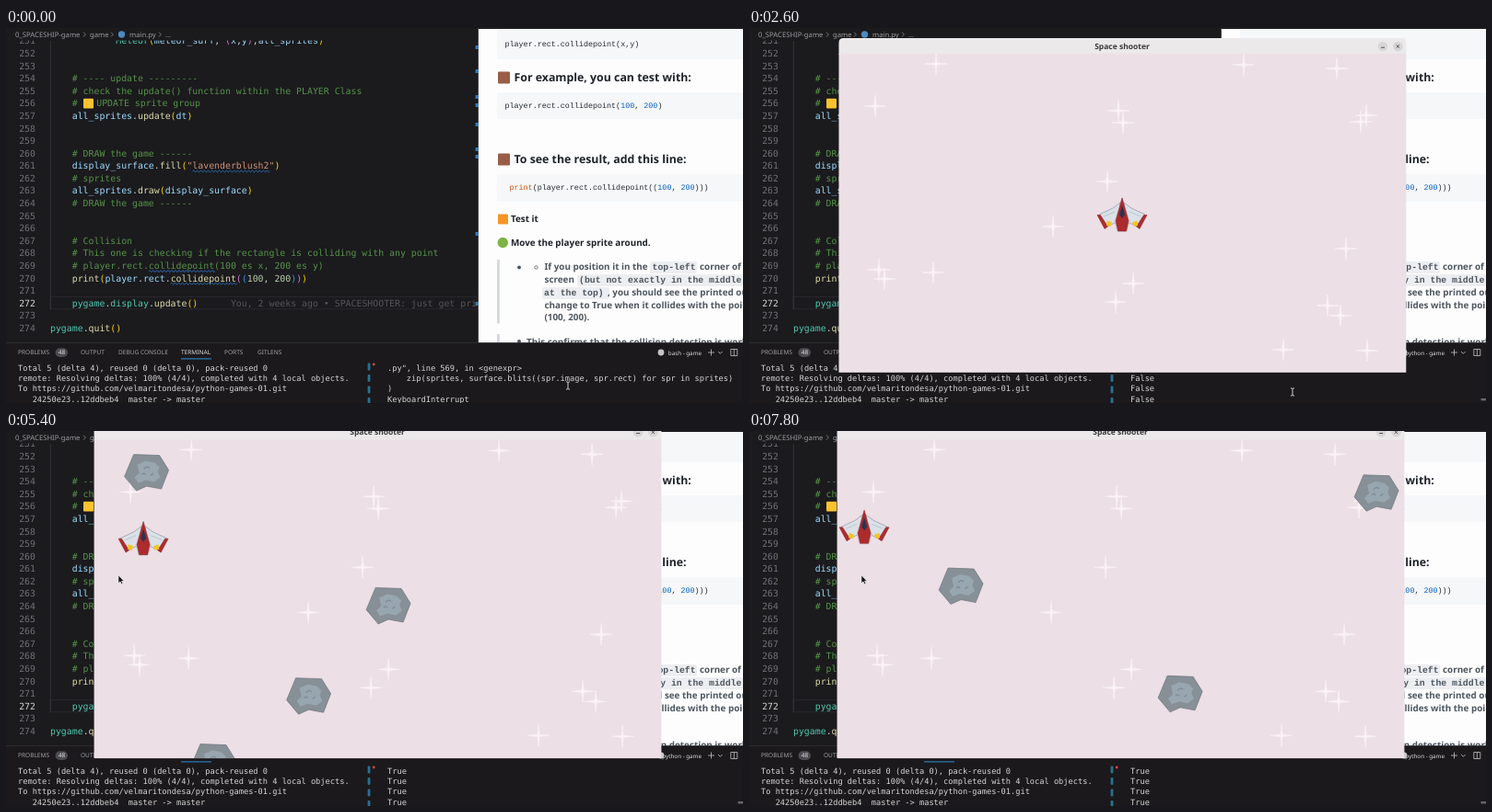
Animation of 800x408 px, one loop 8 s. Source, as an HTML page:

```html
<!DOCTYPE html>
<html lang="en">
<head>
<meta charset="utf-8">
<title>Space shooter</title>
<style>
html, body { margin: 0; width: 100%; height: 100%; overflow: hidden; background: #1b1a1d; }
svg { display: block; width: 100vw; height: 100vh; }
text { white-space: pre; text-rendering: geometricPrecision; }
.code { font: 9.87px "DejaVu Sans Mono", monospace; fill: #d4d4d4; }
.term { font: 8.66px "DejaVu Sans Mono", monospace; fill: #d6d6d6; }
.ui { font: 6.55px "Noto Sans", sans-serif; fill: #a2a2a5; }
.shell { font-size: 6.25px; text-anchor: end; }
.crumb { font: 7.7px "Noto Sans", sans-serif; fill: #9c9c9f; }
.doc { font: bold 9.87px "Noto Sans", sans-serif; fill: #1f2328; }
.head { font-size: 12.35px; }
.quote { fill: #4d565f; }
.block { font: 8.4px "Liberation Mono", monospace; fill: #24292e; }
.inline { font: bold 9.8px "Liberation Mono", monospace; fill: #4d565f; }
.title { font: bold 8.5px "Noto Sans", sans-serif; fill: #3a3a3a; text-anchor: middle; }
.c { fill: #559349; } .v { fill: #9cdcfe; } .f { fill: #dcdcaa; } .t { fill: #4ec9b0; }
.s { fill: #ce9178; } .n { fill: #b5cea8; } .g { fill: #ffd700; } .m { fill: #da70d6; }
.b { fill: #179fff; } .h { fill: #56565a; } .num { fill: #6f7278; } .on { fill: #dcdcdc; }
.k { fill: #005cc5; } .o { fill: #c2560c; }
.user { fill: #8ae234; font-weight: bold; } .path { fill: #5c9de6; font-weight: bold; }
</style>
</head>
<body>
<svg id="stage" viewBox="0 0 800 408" preserveAspectRatio="none"></svg>
<script>
const LOOP = 8000, STEP = 200;
const CHAR = 5.94, ROW = 13.59, TERM_CHAR = 5.213, TERM_ROW = 11.1;
const stage = document.getElementById('stage');

const text = (x, y, cls, s) => `<text x="${x}" y="${y}" class="${cls}">${s}</text>`;
const rect = (x, y, w, h, fill, extra = '') =>
  `<rect x="${x}" y="${y}" width="${w}" height="${h}" fill="${fill}" ${extra}/>`;
const dot = (x, y, r, fill, extra = '') => `<circle cx="${x}" cy="${y}" r="${r}" fill="${fill}" ${extra}/>`;
const poly = (points, fill, stroke = 'none', w = 0.7) =>
  `<polygon points="${points}" fill="${fill}" stroke="${stroke}" stroke-width="${w}" stroke-linejoin="round"/>`;
const line = (d, color, w = 0.8) => `<path d="${d}" fill="none" stroke="${color}" stroke-width="${w}"/>`;

// "f:print|g:(" becomes coloured spans
const spans = s => s.split('|').map(p => `<tspan class="${p[0]}">${p.slice(2)}</tspan>`).join('');
const plain = s => s.split('|').map(p => p.slice(2)).join('');

const FIRST = 251, CURRENT = 272;
const LISTING = `            t:Meteor|g:(|v:meteor_surf|x:, |m:(|v:x|x:,|v:y|m:)|x:,|v:all_sprites|g:)


    c:# ---- update ---------
    c:# check the update() function within the PLAYER Class
    c:#   <tspan dx="2.7">UPDATE sprite group</tspan>
    v:all_sprites|x:.|f:update|g:(|v:dt|g:)


    c:# DRAW the game ------
    v:display_surface|x:.|f:fill|g:(|s:"lavenderblush2"|g:)
    c:# sprites
    v:all_sprites|x:.|f:draw|g:(|v:display_surface|g:)
    c:# DRAW the game ------


    c:# Collision
    c:# This one is checking if the rectangle is colliding with any point
    c:# player.rect.collidepoint(100 es x, 200 es y)
    f:print|g:(|v:player|x:.|v:rect|x:.|f:collidepoint|m:(|b:(|n:100|x:, |n:200|b:)|m:)|g:)

    t:pygame|x:.|t:display|x:.|f:update|g:()|h:      You, 2 weeks ago • SPACESHOOTER: just get pri

t:pygame|x:.|f:quit|g:()`.split('\n');

function wave(x, y, width) {
  return line(`M${x} ${y}` + 'q1 -1.8 2 0t2 0'.repeat(Math.round(width / 4)), '#3794ff', 0.7);
}

function codeRow(src, i) {
  const n = FIRST + i, y = 17.4 + i * ROW;
  let s = text(32 - 3 * CHAR, y, 'code ' + (n === CURRENT ? '' : 'num'), n);
  if (!src) return s;
  const indent = src.search(/\S/), body = src.trim();
  s += text(48 + indent * CHAR, y, 'code', spans(body));
  const typo = plain(body).match(/lavenderblush2|collidepoint/);
  return typo ? s + wave(48 + (indent + typo.index) * CHAR, y + 2.6, typo[0].length * CHAR) : s;
}

function editor() {
  let s = rect(0, 0, 513, 343, '#1b1a1d');
  s += rect(48, 292.4, 463, 13.4, 'none', 'stroke="#2b2a2d" stroke-width=".8"');
  s += line('M48.3 14V306', '#3c3c40');
  s += LISTING.map(codeRow).join('') + rect(84, 76.8, 11, 10.6, '#f9c22e', 'rx="1"');
  s += rect(0, 0, 513, 13.6, '#1b1a1d');
  s += text(10, 9.8, 'crumb', '0_SPACESHIP-game') + text(91, 9.8, 'crumb', 'game');
  s += text(134, 9.8, 'crumb', 'main.py') + text(173, 9.8, 'crumb', '…');
  for (const x of [84, 114, 166]) s += line(`M${x} 4.6l2.4 2.5l-2.4 2.5`, '#8a8a8d');
  s += dot(125.5, 7, 3.7, '#4b8bbe');
  for (const y of [19, 45, 73, 82, 103, 130, 138, 222, 298]) s += rect(509.6, y, 3, 4, '#2f7fc4');
  return s;
}

function preview() {
  const square = (y, size, color) => rect(534, y - size / 2, size, size, color, 'rx="1"');
  const block = (y, h) => rect(533, y, 267, h, '#f5f7f9');
  const chip = (x, y, w) => rect(x, y, w, 13, '#eceef1', 'rx="2"');
  let s = rect(512.8, 0, 287.2, 343, '#fdfdfe') + block(0, 34) + block(70, 29) + block(159, 30);
  s += rect(512.8, 0, 287.2, 1, '#1b1a1d');
  s += text(541.5, 19.6, 'block', 'player.rect.collidepoint(x,y)');
  s += square(54, 13, '#9a5d47') + text(551.5, 58.4, 'doc head', 'For example, you can test with:');
  s += text(541.5, 86.6, 'block', spans('x:player.rect.collidepoint(|k:100|x:, |k:200|x:)'));
  s += square(143, 13, '#9a5d47') + text(551.5, 147.4, 'doc head', 'To see the result, add this line:');
  s += text(546.5, 176.2, 'block', spans('o:print|x:(player.rect.collidepoint((|k:100|x:, |k:200|x:)))'));
  s += square(208, 11, '#f79329') + text(548, 211.4, 'doc', 'Test it');
  s += dot(539.3, 233.5, 5.7, '#7cb342') + text(548, 236.9, 'doc', 'Move the player sprite around.');
  s += rect(533, 252, 2.8, 69.5, '#d3d8de') + rect(533, 333, 2.8, 10, '#d3d8de');
  s += dot(557, 260.5, 2, '#4d565f') + dot(575.5, 260.5, 1.7, 'none', 'stroke="#4d565f" stroke-width=".8"');
  s += chip(699, 254, 51) + chip(620, 268, 180) + chip(582, 282, 73);
  ['If you position it in the', 'screen', '', 'change to True when it collides with the point', '(100, 200).']
    .forEach((l, i) => { s += text(584.5, 263.4 + i * 13.75, 'doc quote', l); });
  s += text(701.5, 263.4, 'inline', 'top-left') + text(753, 263.4, 'doc quote', 'corner of');
  s += text(622, 277.2, 'inline', '(but not exactly in the middle');
  s += text(584, 290.9, 'inline', 'at the top)') + text(653, 290.9, 'doc quote', ', you should see the printed out');
  s += dot(557, 341, 2, '#4d565f') + text(565, 345.2, 'doc quote', 'This confirms that the collision detection is working');
  return s;
}

const termRows = (x, rows) => rows.map((r, i) => text(x, 373.2 + i * TERM_ROW, 'term', r)).join('');

function panel() {
  let s = rect(0, 342.4, 800, 65.6, '#1b191c') + rect(0, 342.2, 800, 0.7, '#343237');
  const tabs = { PROBLEMS: 13, OUTPUT: 81, 'DEBUG CONSOLE': 122, TERMINAL: 190, PORTS: 237, GITLENS: 273 };
  for (const name in tabs) s += text(tabs[name], 355.4, name === 'TERMINAL' ? 'ui on' : 'ui', name);
  s += rect(190, 359.4, 33, 1, '#2f8fd8');
  s += rect(53.5, 348.2, 13.5, 9.8, '#4c4b50', 'rx="4.9"') + text(56.7, 355.4, 'ui on', '48');
  s += dot(711, 353, 3.4, '#c4c4c4') + '<text id="shell" x="755" y="355.5" class="ui on shell"></text>';
  s += line('M762 353h7M765.5 349.5v7M773 352l2.3 2.3l2.3 -2.3M786.8 349.5h7v7h-7zM790.3 349.5v7', '#c4c4c4');
  s += termRows(13, [
    'Total 5 (delta 4), reused 0 (delta 0), pack-reused 0',
    'remote: Resolving deltas: 100% (4/4), completed with 4 local objects.',
    'To https://github.com/velmaritondesa/python-games-01.git',
    '   24250e23..12ddbeb4  master -&gt; master']);
  for (let y = 364.5; y < 408; y += 12.5) s += rect(392.6, y, 2.8, 8, '#2c6f8e', 'rx="1"');
  return s + dot(399.2, 366, 1.4, '#e0443e') + '<g id="term"></g>';
}

const VIEW = [97.5, 28.2, 615.8, 346.6];
const STARS = '203,39 537,40 638,44 137,85 401,90 406,103 670,95 664,102 389,167 330,216 648,240 '
  + '141,263 147,273 200,266 417,278 398,298 628,302 642,313 580,350 671,351';
const star = p => `<path transform="translate(${p})" fill="#fbf3f7" stroke="#faf0f5" stroke-width=".7"
  d="M0-12L1.1-1.1L12 0L1.1 1.1L0 12L-1.1 1.1L-12 0L-1.1-1.1Z"/>`;

const wing = poly('2,-13 10,-7 25,0 18,14 8,9 5,12', '#dbe1e8', '#8f97a0')
  + line('M8 -3L20 2', '#b3bec9')
  + poly('23.5,0.5 27,0.5 19,15.5 15.5,13', '#b02a2d', '#7a2228', 0.5)
  + poly('11,8.5 16.5,6.5 17,12 12.5,13', '#f2c522');
const SHIP = wing + `<g transform="scale(-1 1)">${wing}</g>`
  + poly('0,-18.5 8,8 5,18.5 -5,18.5 -8,8', '#ece6e8', '#a9a3a8', 0.4)
  + poly('0,-18 7,7 4.5,18 -4.5,18 -7,7', '#ad2a2d', '#7c1f25', 0.5)
  + poly('0,-10 3,0 0,4 -3,0', '#2c3350');
const ROCK = poly('-14,-20 14,-19 24,-3 16,17.5 0,14.5 -11,19.5 -24,4', '#879096', '#6d757b')
  + poly('-10,-9 -1,-13 9,-11 14,-6 12,-1 15,5 8,10 -1,8 -9,11 -13,5 -8,0', '#98a6af')
  + line('M-3 -4q3 -4 6 -1M-5 2q2 -3 4 0M4 2q2 1 3 -2', '#7f8c99', 1.4);

// one meteor per beat: x and y where it spawns, then drift and fall per second
const SPAWN = 3.11, BEAT = 0.46, FALL = 205;
const METEORS = [[499, 27], [53, 81, 95, 163], [288, -31, 31, 247], [427, 59, -11, 165], [204, -28, -110],
  [519, 46], [317, 75], [92, 62, -50], [470, 98], [232, 75], [683, 68]];

const gameWindow = () => `<g id="win">
  <path d="M97.5 29V16q0 -5 5 -5H708.3q5 0 5 5V29Z" fill="#ebe9ea"/>
  ${text(405, 22.6, 'title', 'Space shooter')}
  ${dot(688, 20, 5.3, '#d8d6d7')}${dot(704.3, 20, 5.3, '#d8d6d7')}
  ${line('M686 21.2h4M702.6 18.3l3.4 3.4M706 18.3l-3.4 3.4', '#444', 0.9)}
  ${rect(...VIEW, '#ecdfe5')}
  <g clip-path="url(#view)">${STARS.split(' ').map(star).join('')}<g id="ship">${SHIP}</g>
  ${METEORS.map((m, i) => `<g id="rock${i}">${ROCK}</g>`).join('')}</g></g>`;

stage.innerHTML = `<defs><clipPath id="view">${rect(...VIEW, '#fff')}</clipPath></defs>`
  + editor() + preview() + panel() + gameWindow()
  + `<g id="beam">${line('M-2 -4.2q2 0 2 1V3.2q0 1 -2 1M2 -4.2q-2 0 -2 1M0 3.2q0 1 2 1', '#e4e4e4', 0.9)}</g>`
  + '<path id="arrow" d="M0 -4V4.6L2 2.8L3.4 5.6L4.8 5L3.5 2.3H6Z" fill="#141414" stroke="#fff" stroke-width=".5"/>';

const $ = id => document.getElementById(id);
const move = (id, x, y) => $(id).setAttribute('transform', `translate(${x} ${y})`);
const show = (id, on) => $(id).setAttribute('visibility', on ? 'inherit' : 'hidden');

// keys: [time, x, y], joined by straight moves
function along(keys, t) {
  const i = keys.findIndex(k => k[0] >= t);
  if (i < 0) return keys[keys.length - 1].slice(1);
  if (i === 0) return keys[0].slice(1);
  const [a, ax, ay] = keys[i - 1], [b, bx, by] = keys[i], p = (t - a) / (b - a);
  return [ax + (bx - ax) * p, ay + (by - ay) * p];
}

const RUN = 2.2, OPEN = 2.6;
const MOUSE = [[0, 610, 389], [1.2, 606, 405], [2.6, 590, 396], [3, 124, 180], [3.2, 122, 161]];
const DRAG = [[3, 0, 0], [3.2, -1.9, -18.7]];
const FLIGHT = [[3, 405, 203], [4.4, 161, 195], [5.2, 151, 137], [6.4, 151, 127], [7.8, 127, 123]];

const TRACE = ['.py", line 569, in &lt;genexpr&gt;',
  '    zip(sprites, surface.blits((spr.image, spr.rect) for spr in sprites)', ')', 'KeyboardInterrupt'];
const PROMPT = ['(.venv) <tspan class="user">tavorik@tavomirelno</tspan>:<tspan class="path">~/Documents/0_PYTHON-all/PYTHON-PRIVAT/pytho</tspan>',
  '<tspan class="path">n-games-01/0_SPACESHIP-game/game</tspan>$ '];

function terminal(t, hit) {
  if (t >= OPEN) return termRows(414, Array(4).fill(hit ? 'True' : 'False')) + rect(794.5, 403, 5.5, 2.4, '#68666b');
  if (t < 0.6) return termRows(414, TRACE);
  const typed = 'python main.py'.slice(0, Math.max(0, Math.round((t - 1.2) * 18)));
  const above = t < 1 ? TRACE.slice(2) : [];
  const col = t < RUN ? 34 + typed.length : 0;
  const y = 376 + (above.length + (t < RUN ? 1 : 2)) * TERM_ROW - TERM_ROW * 0.1;
  return termRows(414, [...above, PROMPT[0], PROMPT[1] + typed])
    + rect(414 + col * TERM_CHAR, y - 9, 5, 10.6, '#d0d0d0')
    + dot(408.3, 382 + above.length * TERM_ROW, 2, 'none', 'stroke="#77777b" stroke-width=".8"');
}

function draw(t) {
  const [sx, sy] = along(FLIGHT, t), [mx, my] = along(MOUSE, t);
  const open = t >= OPEN;
  // the ship touches the point (100, 200) of the game
  const hit = Math.abs(sx - 146) < 27 && Math.abs(sy - 124) < 18;
  $('term').innerHTML = terminal(t, hit);
  $('shell').textContent = t >= RUN ? 'python - game' : 'bash - game';
  show('win', open);
  move('win', ...along(DRAG, t));
  move('ship', sx, sy);
  METEORS.forEach(([x, y, drift = 0, fall = FALL], i) => {
    const age = t - SPAWN - i * BEAT;
    show('rock' + i, age >= 0);
    move('rock' + i, x + drift * age, y + fall * age);
  });
  const inside = open && my < 375;
  show('arrow', inside);
  show('beam', !inside);
  move('arrow', mx, my);
  move('beam', mx, my);
}

function tick(now) {
  draw(Math.floor(now % LOOP / STEP) * STEP / 1000);
  requestAnimationFrame(tick);
}
draw(0);
requestAnimationFrame(tick);
</script>
</body>
</html>
```
